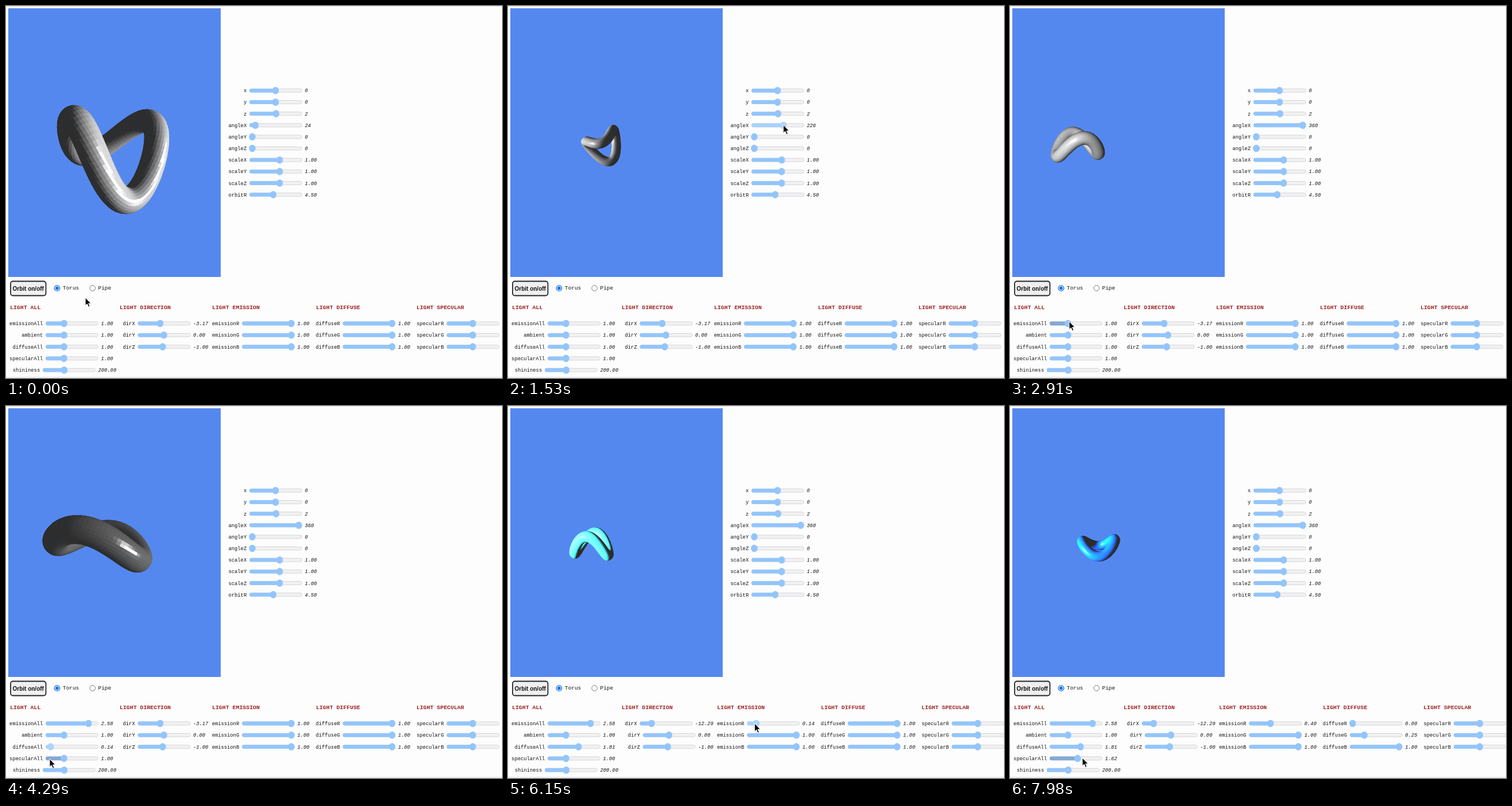
An HTML page with a canvas for the animation above (8000 ms loop, 864x648 px).

```html
<!DOCTYPE html>
<html lang="en">
<head>
<meta charset="utf-8">
<title>Light and transform controls</title>
<style>
html, body { margin: 0; width: 100%; height: 100%; overflow: hidden; background: #fdfdfd; }
canvas { position: absolute; left: 4px; top: 4px; }
svg { position: absolute; left: 0; top: 0; }
text { font: 8.8px "Courier New", "Liberation Mono", monospace; fill: #111; white-space: pre; }
.val { font-style: italic; }
.head { font-size: 9.9px; font-weight: bold; fill: #9c2323; }
.radio { font-size: 9.4px; }
.btn { font: bold 10px Arial, "Liberation Sans", sans-serif; }
</style>
</head>
<body>
<canvas id="view" width="370" height="468"></canvas>
<svg id="ui" width="864" height="648" viewBox="0 0 864 648"></svg>
<script>
const LOOP = 8000, RAD = Math.PI / 180;
const ui = document.getElementById('ui');
const ctx = document.getElementById('view').getContext('2d');

function add(tag, attrs, parent = ui, text) {
  const el = document.createElementNS('http://www.w3.org/2000/svg', tag);
  for (const k in attrs) el.setAttribute(k, attrs[k]);
  if (text !== undefined) el.textContent = text;
  return parent.appendChild(el);
}

// Linear track through rows of [time, value, value...]
function track(rows, t, col = 1) {
  if (t <= rows[0][0]) return rows[0][col];
  for (let i = 1; i < rows.length; i++) {
    const a = rows[i - 1], b = rows[i];
    if (t <= b[0]) return a[col] + (b[col] - a[col]) * (t - a[0]) / (b[0] - a[0]);
  }
  return rows[rows.length - 1][col];
}

// Smooth track through the same kind of rows
function smooth(rows, t, col) {
  const n = rows.length;
  const slope = i => {
    const a = rows[Math.max(0, i - 1)], b = rows[Math.min(n - 1, i + 1)];
    return (b[col] - a[col]) / (b[0] - a[0]);
  };
  let i = 0;
  while (i < n - 2 && t > rows[i + 1][0]) i++;
  const a = rows[i], b = rows[i + 1], h = b[0] - a[0];
  const u = Math.min(1, (t - a[0]) / h), w = 1 - u;
  return a[col] * w * w * (1 + 2 * u) + b[col] * u * u * (3 - 2 * u)
    + h * u * w * (slope(i) * w - slope(i + 1) * u);
}

// Slider drags
const drags = {
  angleX: [[900, 24], [1950, 360]],
  emissionAll: [[3030, 1], [3500, 2.58]],
  diffuseAll: [[3700, 1], [4230, 0.14], [4300, 0.14], [4750, 1.81]],
  dirX: [[4980, -3.17], [5450, -12.29]],
  emissionR: [[5780, 1], [6080, 0.14], [6180, 0.14], [6500, 0.4]],
  diffuseR: [[6700, 1], [6950, 0]],
  diffuseG: [[7070, 1], [7350, 0.25]],
  specularAll: [[7560, 1], [7860, 1.62]]
};
const value = (name, t) => track(drags[name], t);

// Pointer tip: time, x, y
const pointer = [
  [0, 138, 508], [300, 180, 470], [780, 431, 205], [900, 434, 206], [1950, 510, 208],
  [2070, 513, 211], [2250, 513, 211], [2800, 104, 547], [3030, 102, 552], [3500, 144, 553],
  [3700, 101, 594], [4230, 76, 613], [4300, 76, 615], [4750, 123, 597], [4980, 268, 553],
  [5450, 250, 553], [5780, 502, 553], [6080, 431, 553], [6180, 429, 553], [6500, 453, 554],
  [6700, 678, 553], [6950, 597, 554], [7070, 678, 573], [7350, 617, 574], [7560, 101, 613],
  [7860, 119, 614], [7970, 126, 613]
];

// Static parts
add('rect', { width: 864, height: 1, fill: '#dcdcdc' });
add('rect', { y: 646, width: 864, height: 1, fill: '#dedede' });
add('rect', { x: 8, y: 479.5, width: 61.5, height: 25, rx: 4, fill: '#efefef', stroke: '#23232b', 'stroke-width': 1.8 });
add('text', { x: 38.7, y: 495.5, 'text-anchor': 'middle', class: 'btn' }, ui, 'Orbit on/off');
add('circle', { cx: 89, cy: 491.5, r: 4.8, fill: '#fff', stroke: '#1672e6', 'stroke-width': 1.3 });
add('circle', { cx: 89, cy: 491.5, r: 2.9, fill: '#1672e6' });
add('circle', { cx: 150.7, cy: 491.5, r: 4.8, fill: '#fff', stroke: '#777' });
add('text', { x: 99, y: 494, class: 'radio' }, ui, 'Torus');
add('text', { x: 160.5, y: 494, class: 'radio' }, ui, 'Pipe');

const fixed = add('g', {}), moving = add('g', {});
const head = (x, s, parent) => add('text', { x, y: 528, class: 'head' }, parent, s);
head(7, 'LIGHT ALL', fixed);
head(198, 'LIGHT DIRECTION', fixed);
head(359, 'LIGHT EMISSION', moving);
head(540, 'LIGHT DIFFUSE', moving);
head(715, 'LIGHT SPECULAR', moving);

const sliders = [];
function slider(parent, x, y, name, min, max, start, digits = 2) {
  add('text', { x: x - 4.8, y: y + 3, 'text-anchor': 'end' }, parent, name);
  add('rect', { x: x + .5, y: y - 3, width: 91, height: 6, rx: 3, fill: '#f1f1f1', stroke: '#cfcfd6', 'stroke-width': .8 }, parent);
  const fill = add('rect', { x, y: y - 3.4, height: 6.8, rx: 3.4 }, parent);
  const thumb = add('ellipse', { cy: y, rx: 5.8, ry: 6.3 }, parent);
  const out = add('text', { x: x + 96.5, y: y + 3, class: 'val' }, parent);
  const s = { parent, x, y, name, fill, thumb };
  s.set = v => {
    const c = 5 + 81 * (v - min) / (max - min);
    fill.setAttribute('width', c);
    thumb.setAttribute('cx', x + c);
    out.textContent = x > 760 ? '' : v.toFixed(digits);
  };
  s.set(start);
  sliders.push(s);
}

const rowY = i => 553 + 20.3 * i;
['x', 'y', 'z', 'angleX', 'angleY', 'angleZ', 'scaleX', 'scaleY', 'scaleZ', 'orbitR'].forEach((name, i) => {
  const y = 147.3 + 20.15 * i;
  if (i < 3) slider(fixed, 424, y, name, -100, 100, i === 2 ? 2 : 0, 0);
  else if (i < 6) slider(fixed, 424, y, name, 0, 360, i === 3 ? 24 : 0, 0);
  else slider(fixed, 424, y, name, 0, i < 9 ? 1.7 : 10, i < 9 ? 1 : 4.5);
});
['emissionAll', 'ambient', 'diffuseAll', 'specularAll'].forEach((name, i) => slider(fixed, 69, rowY(i), name, 0, 3, 1));
slider(fixed, 64, rowY(4), 'shininess', 0, 500, 200);
slider(fixed, 229.5, rowY(0), 'dirX', -20, 20, -3.17);
slider(moving, 229.5, rowY(1), 'dirY', -20, 20, 0);
slider(moving, 229.5, rowY(2), 'dirZ', -20, 20, -1);
[['emission', 411, 1], ['diffuse', 586.5, 1], ['specular', 767.5, 2]].forEach(([name, x, max]) =>
  [...'RGB'].forEach((c, i) => slider(moving, x, rowY(i), name + c, 0, max, 1)));

const arrow = add('path', {
  d: 'M0 0V14L3.2 11L5.6 16.4L7.9 15.4L5.6 10.2H10Z',
  fill: '#000', stroke: '#fff', 'stroke-width': 1
});

// Ring pose: time, orbit angle, view angle, wave height, tilt, roll, drop
const poses = [
  [0, 3, -38, .7, 0, 15, 12],
  [870, -360, -315, .7, 0, 0, 11],
  [2070, -720, -675, .7, 0, 0, -3],
  [2910, -980, -1005, .48, 10, 0, 4],
  [4290, -1428, -1330, .25, 5, 8, -3],
  [6150, -2027, -1875, .6, 10, 0, 3],
  [7980, -2737, -2340, .33, 18, -3, 5]
];

const turn = (a, b, r) => [a * Math.cos(r) - b * Math.sin(r), a * Math.sin(r) + b * Math.cos(r)];
function rotX([x, y, z], r) { [y, z] = turn(y, z, r); return [x, y, z]; }
function rotY([x, y, z], r) { [x, z] = turn(x, z, r); return [x, y, z]; }
function rotZ([x, y, z], r) { [x, y] = turn(x, y, r); return [x, y, z]; }
const dot = (a, b) => a[0] * b[0] + a[1] * b[1] + a[2] * b[2];
function unit(v) { const n = Math.hypot(...v); return v.map(c => c / n); }

const SEG = 96, SIDES = 28, TUBE = .28;

function drawRing(t) {
  const orbit = smooth(poses, t, 1) * RAD;
  const spin = smooth(poses, t, 2) * RAD - orbit;
  const [wave, tilt, roll, drop] = [3, 4, 5, 6].map(c => track(poses, t, c));
  const depth = 4.5 - 2 * Math.cos(orbit);
  const scale = 2.2 / (depth - .3), eye = 5.5 / scale, size = 75 * scale;
  const cx = 185 - 348 * Math.sin(orbit) / depth, cy = 234 + drop;

  const place = p => rotZ(rotX(rotY(rotX(rotY(p, spin), value('angleX', t) * RAD), orbit), tilt * RAD), -roll * RAD);
  const axes = [[1, 0, 0], [0, 1, 0], [0, 0, 1]].map(place);
  const view = p => [0, 1, 2].map(i => p[0] * axes[0][i] + p[1] * axes[1][i] + p[2] * axes[2][i]);

  const light = unit(rotY([-value('dirX', t), 0, 1], orbit));
  const half = unit([light[0], light[1], light[2] + 1]);
  const emit = [value('emissionR', t), 1, 1].map(c => c * value('emissionAll', t));
  const diffuse = [value('diffuseR', t), value('diffuseG', t), 1].map(c => c * value('diffuseAll', t));
  const shine = .6 * value('specularAll', t);

  const rings = [];
  for (let i = 0; i < SEG; i++) {
    const a = i / SEG * 2 * Math.PI, c = Math.cos(a), s = Math.sin(a);
    const [tx, ty, tz] = unit([-s, -2 * wave * Math.sin(2 * a), c]);
    const up = [ty * s, tz * c - tx * s, -ty * c];
    const ring = [];
    for (let j = 0; j < SIDES; j++) {
      const b = j / SIDES * 2 * Math.PI, cb = Math.cos(b), sb = Math.sin(b);
      const n = [c * cb + up[0] * sb, up[1] * sb, s * cb + up[2] * sb];
      const p = view([c + TUBE * n[0], wave * Math.cos(2 * a) + TUBE * n[1], s + TUBE * n[2]]);
      const k = size * eye / (eye - p[2]);
      ring.push({ p, n: view(n), x: cx + p[0] * k, y: cy - p[1] * k });
    }
    rings.push(ring);
  }

  const faces = [];
  for (let i = 0; i < SEG; i++) for (let j = 0; j < SIDES; j++) {
    const r0 = rings[i], r1 = rings[(i + 1) % SEG], k = (j + 1) % SIDES;
    const q = [r0[j], r1[j], r1[k], r0[k]];
    const n = unit([0, 1, 2].map(m => q[0].n[m] + q[1].n[m] + q[2].n[m] + q[3].n[m]));
    const p = q[0].p;
    if (dot(n, [-p[0], -p[1], eye - p[2]]) < -.12 * eye) continue;
    faces.push({ q, n, z: q[0].p[2] + q[1].p[2] + q[2].p[2] + q[3].p[2] });
  }
  faces.sort((a, b) => a.z - b.z);

  ctx.fillStyle = '#5588ee';
  ctx.fillRect(0, 0, 370, 468);
  ctx.lineWidth = .7;
  ctx.lineJoin = 'round';
  for (const { q, n } of faces) {
    const lit = Math.max(0, dot(n, light));
    const spec = lit > 0 ? shine * Math.pow(Math.max(0, dot(n, half)), 110) : 0;
    const rgb = emit.map((e, i) => Math.min(255, 255 * (.18 + .72 * lit * e * diffuse[i] + spec * e)) | 0);
    ctx.fillStyle = ctx.strokeStyle = `rgb(${rgb})`;
    ctx.beginPath();
    q.forEach(v => ctx.lineTo(v.x, v.y));
    ctx.closePath();
    ctx.fill();
    ctx.stroke();
  }
}

function drawControls(t) {
  const px = track(pointer, t, 1), py = track(pointer, t, 2);
  // A longer dirX readout widens its column
  const shift = value('dirX', t) <= -9.995 ? 5.3 : 0;
  moving.setAttribute('transform', `translate(${shift} 0)`);
  for (const s of sliders) {
    const drag = drags[s.name];
    if (drag) s.set(value(s.name, t));
    const active = drag && value(s.name, t - 100) !== value(s.name, t + 100);
    const x = s.x + (s.parent === moving ? shift : 0);
    const hover = px > x && px < x + 91 && Math.abs(py - s.y) < 6;
    s.fill.setAttribute('fill', active ? '#a9d2fb' : hover ? '#82a9d6' : '#93c5fb');
    s.thumb.setAttribute('fill', active ? '#aed5fb' : '#93c5fb');
  }
  arrow.setAttribute('transform', `translate(${px} ${py})`);
}

function frame(now) {
  const t = now % LOOP;
  drawRing(t);
  drawControls(t);
  requestAnimationFrame(frame);
}
requestAnimationFrame(frame);
</script>
</body>
</html>
```
